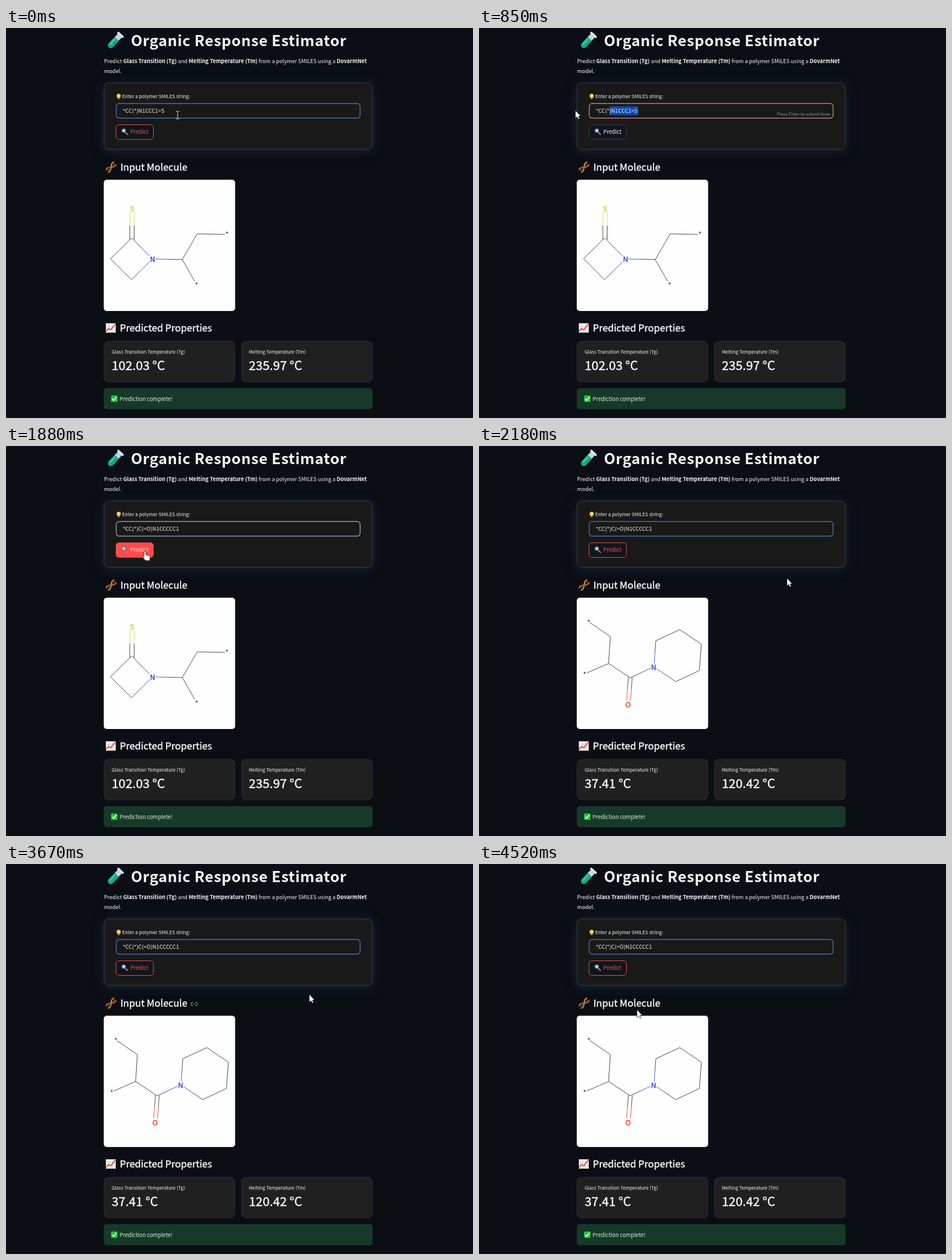
Recreate the animation shown at these times as an HTML page. Size 800 by 667 pixels, loop 4550 ms.

```html
<!DOCTYPE html>
<html lang="en">
<head>
<meta charset="utf-8">
<title>Prediction form</title>
<style>
html, body { margin: 0; width: 100%; height: 100%; overflow: hidden; background: #0b0e15; }
svg { display: block; width: 100vw; height: 100vh; }
text { font: 9.3px "Noto Sans CJK JP", "Noto Sans CJK SC", "Noto Sans CJK KR", "Open Sans", sans-serif; fill: #f8f8fa; white-space: pre; }
.title { font-size: 25.5px; font-weight: 700; letter-spacing: .65px; }
.head { font-size: 16.5px; stroke: #f8f8fa; stroke-width: .4; }
.value { font-size: 21.3px; stroke: #f8f8fa; stroke-width: .45; }
.label { font-size: 8.2px; }
.small { font-size: 8.05px; }
.hint { font-size: 7.4px; fill: #98989c; text-anchor: end; }
.para { font-size: 9.2px; }
.para tspan { font-weight: 600; }
.glow { filter: drop-shadow(0 3px 9px #1d3d5a80); }
.card { fill: #212020; stroke: #2c2f35; }
.mol { fill: none; stroke-width: 1; stroke-linejoin: round; }
.mol text { font-size: 12px; text-anchor: middle; stroke-width: .4; }
.mol .star { font-size: 13px; fill: #444; }
.dark { stroke: #4b4b4b; }
.blue { stroke: #4a5bdc; }
.red { stroke: #f0523f; }
.yellow { stroke: #dede62; }
</style>
</head>
<body>
<svg viewBox="0 0 800 667" preserveAspectRatio="none">
  <g transform="translate(186.500 22) rotate(43) scale(.94)">
    <path d="M-5-14V11a5 5 0 0 0 10 0V-14Z" fill="#b9d9e6"/>
    <path d="M-5-5V11a5 5 0 0 0 10 0V-5Z" fill="#12ab83"/>
    <path d="M-2-3V11" stroke="#4fd6ae" stroke-width="2"/>
    <rect x="-7.500" y="-17" width="15" height="4" rx="2" fill="#d5e8f2"/>
  </g>
  <text class="title" x="214" y="30.500">Organic Response Estimator</text>
  <text class="para" x="168" y="60">Predict <tspan>Glass Transition (Tg)</tspan> and <tspan>Melting Temperature (Tm)</tspan> from a polymer SMILES using a <tspan>DovarmNet</tspan></text>
  <text class="para" x="168" y="77">model.</text>

  <rect class="glow" x="168" y="94" width="459.500" height="113.500" rx="8" fill="#191919" stroke="#393d42"/>
  <circle cx="193" cy="116" r="3.500" fill="#fbd34b"/>
  <path d="M191.500 119h3v2.500h-3z" fill="#b9a878"/>
  <text class="label" x="199" y="120">Enter a polymer SMILES string:</text>
  <rect id="field" x="188.800" y="129.100" width="417.800" height="25.100" rx="5" fill="#191919" stroke-width="1.200"/>
  <rect id="mark" y="134" height="15" fill="#1149a8"/>
  <text id="smiles" x="200" y="145"></text>
  <text id="hint" class="hint" x="602" y="150">Press Enter to submit form</text>
  <rect id="button" x="188.500" y="165.500" width="64" height="25" rx="5"/>
  <path d="M204 178l4 4" stroke="#8b8f98" stroke-width="2" stroke-linecap="round"/>
  <circle cx="201.800" cy="175.500" r="3.300" fill="#a9d3ee" stroke="#59616d"/>
  <text id="caption" x="213" y="181">Predict</text>

  <g transform="translate(180 238) rotate(-45)" fill="none" stroke-width="1.500">
    <path d="M-7-2.500V2.500M-4-3V3M3.500-3V3M7-2.500V2.500" stroke="#7f9a55" stroke-width="1"/>
    <path d="M-10-2C-8-5-4-4 0 0S8 5 10 2" stroke="#ef5b3f"/>
    <path d="M-10 2C-8 5-4 4 0 0S8-5 10-2" stroke="#f3a83c"/>
  </g>
  <text class="head" x="196" y="244">Input Molecule</text>
  <g id="link" fill="none" stroke="#858890" stroke-width="1.200">
    <path d="M321 236.500h-1a3 3 0 0 0 0 6h1M324 236.500h1a3 3 0 0 1 0 6h-1M320 239.500h5"/>
  </g>
  <rect x="167.500" y="259.500" width="225" height="224.500" rx="5" fill="#fefefe"/>
  <g id="before" class="mol">
    <path class="dark" d="M232 376L215.500 359L179 394.500L215 430.500L231 414.500M279 395.500L302 396L327.500 352L375 353M302 396L323 433M212 338V362M219.500 338V362"/>
    <path class="blue" d="M232 376L246 390M231 414.500L246 400M256 395L279 395.500"/>
    <path class="yellow" d="M212.500 315V338M220 315V338"/>
    <text x="216" y="313.500" style="fill:#cccc2b;stroke:#cccc2b">S</text>
    <text x="251" y="399.500" style="fill:#3340cc;stroke:#3340cc">N</text>
    <text class="star" x="378.500" y="358">*</text>
    <text class="star" x="326.500" y="445">*</text>
  </g>
  <g id="after" class="mol">
    <path class="dark" d="M190 302L225 326L222 372L185 388M222 372L259 396.500L277 388M301.500 352L303 333L344 314L381 339L377.500 384L337 403L320 391.500M256 395L254.500 415M262.500 396L261 416"/>
    <path class="blue" d="M277 388L294 380M300 372L301.500 352M320 391.500L304 381"/>
    <path class="red" d="M254.500 415L253 435M261 416L259.500 435"/>
    <text x="299" y="382.500" style="fill:#3340cc;stroke:#3340cc">N</text>
    <text x="255.500" y="446.500" style="fill:#f03c28;stroke:#f03c28">O</text>
    <text class="star" x="188" y="306.500">*</text>
    <text class="star" x="181" y="395.500">*</text>
  </g>

  <rect x="171" y="505" width="17" height="16" fill="#f3f0ee"/>
  <path d="M171 510.500h17M171 516h17M176.500 505v16M182.500 505v16" stroke="#c4cbd0" stroke-width=".7"/>
  <path d="M171.500 519l4-5 4 2 8-10" fill="none" stroke="#e2483d" stroke-width="1.800"/>
  <text class="head" x="195" y="519">Predicted Properties</text>
  <rect class="card" x="168" y="536" width="224" height="69" rx="7"/>
  <rect class="card" x="403.500" y="536" width="224" height="69" rx="7"/>
  <text class="small" x="181" y="556.500">Glass Transition Temperature (Tg)</text>
  <text class="small" x="416" y="556.500">Melting Temperature (Tm)</text>
  <text id="glass" class="value" x="181" y="585"></text>
  <text id="melt" class="value" x="416" y="585"></text>
  <rect x="167.500" y="616" width="460.500" height="36" rx="5" fill="#173928"/>
  <rect x="180" y="628.500" width="11" height="11" rx="1.500" fill="#27c43c"/>
  <path d="M182 634l2.500 3 4.500-6" fill="none" stroke="#fff" stroke-width="1.700"/>
  <text x="194.500" y="637.500" style="fill:#dff3e4">Prediction complete!</text>

  <path id="arrow" d="M.5 0V13.500L3.500 10.700L5.500 15L7.800 14L5.800 9.800H9.800Z" fill="#fff" stroke="#111" stroke-width=".7"/>
  <path id="beam" d="M-3-6.500H-1L0-5.500L1-6.500H3M0-5.500V5.500M-3 6.500H-1L0 5.500L1 6.500H3" fill="none" stroke="#e8e8e8"/>
  <path id="hand" d="M-1.500 1.500a1.500 1.500 0 0 1 3 0V6l6 1.500q1.500.5 1.500 2L8 16H1L-3.500 10.500q0-2 2-1Z" fill="#fff" stroke="#222" stroke-width=".8"/>
</svg>
<script>
const LOOP = 4550;
const FOCUS = 400, PASTE = 1250, CLICK = 1780, RESULT = 2080;
const $ = id => document.getElementById(id);
const show = (id, on) => $(id).style.display = on ? "" : "none";
const set = (id, attrs) => {
  for (const key in attrs) $(id).setAttribute(key, attrs[key]);
};

// time, x, y of the pointer's hot spot
const path = [
  [0, 294, 149], [250, 294, 149], [420, 274, 146], [600, 270, 144],
  [850, 165, 141], [960, 125, 140], [1100, 172, 143], [1350, 180, 148],
  [1680, 237, 180], [1900, 238, 180], [2000, 242, 182], [2150, 527, 226],
  [2760, 527, 226], [3000, 526, 225], [3300, 525, 225], [3670, 519, 223],
  [4100, 516, 224], [4380, 370, 238], [4520, 270, 249]
];
const selection = [[600, 273], [850, 224], [900, 200]];

function at(keys, t) {
  const next = keys.findIndex(key => key[0] > t);
  if (next < 0) return keys[keys.length - 1].slice(1);
  if (!next) return keys[0].slice(1);
  const a = keys[next - 1], b = keys[next];
  const k = (t - a[0]) / (b[0] - a[0]);
  return a.slice(1).map((v, i) => v + (b[i + 1] - v) * k);
}

function draw(t) {
  const done = t >= RESULT;
  const editing = t >= FOCUS && t < CLICK;
  const pressed = t >= CLICK && t < RESULT;
  const accent = t < FOCUS || done;

  $("smiles").textContent = t < PASTE ? "*CC(*)N1CCC1=S" : "*CC(*)C(=O)N1CCCCC1";
  $("glass").textContent = done ? "37.41 °C" : "102.03 °C";
  $("melt").textContent = done ? "120.42 °C" : "235.97 °C";
  show("before", !done);
  show("after", done);
  show("hint", editing);
  show("link", t >= 2240 && t < 4440);

  const [left] = at(selection, t);
  set("mark", { x: left, width: t < PASTE ? 273 - left : 0 });
  set("field", { stroke: editing ? "#e58d92" : pressed ? "#9db4cc" : "#4a7fd0" });
  set("button", {
    fill: pressed ? "#ff4b4b" : "#12151d",
    stroke: pressed ? "#ff4b4b" : accent ? "#d9504f" : "#3a3d45"
  });
  $("caption").style.fill = pressed ? "#e3dfe4" : accent ? "#ea5553" : "#f4f4f6";

  const [x, y] = at(path, t);
  const inField = x > 189 && x < 607 && y > 129 && y < 154;
  const inButton = x > 188 && x < 253 && y > 165 && y < 191;
  const shape = inField ? "beam" : inButton ? "hand" : "arrow";
  for (const id of ["arrow", "beam", "hand"]) show(id, id === shape);
  set(shape, { transform: `translate(${x} ${y})` });
}

function tick() {
  draw(performance.now() % LOOP);
  requestAnimationFrame(tick);
}
tick();
</script>
</body>
</html>
```
